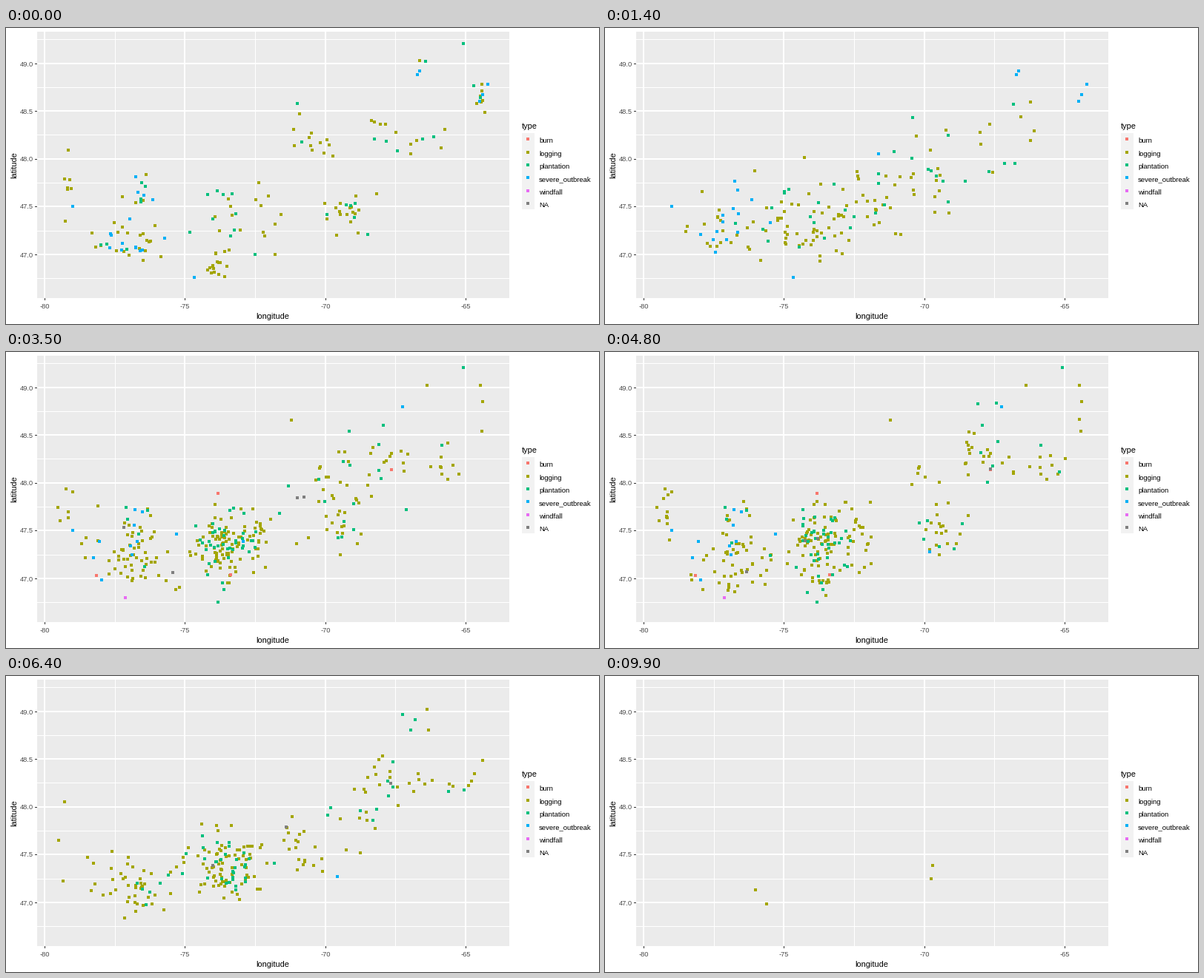
Recreate the animation shown at these times as a matplotlib script. Size 800 by 400 pixels, loop 10000 ms.

```python
import numpy as np
import matplotlib.pyplot as plt
from matplotlib.animation import FuncAnimation
from matplotlib.patches import Rectangle

W, H, DPI = 800, 400, 100
PX = 72 / DPI
rng = np.random.default_rng(11)
plt.rcParams["font.family"] = "Liberation Sans"

COLORS = {
    "burn": "#F8766D",
    "logging": "#A3A500",
    "plantation": "#00BF7D",
    "severe_outbreak": "#00B0F6",
    "windfall": "#E76BF3",
    "NA": "#7F7F7F",
}

# regions where sites gather: centre and spread in pixels
REGIONS = {
    "border": (80, 220, 5, 30),
    "west": (170, 293, 28, 20),
    "upland": (178, 222, 12, 18),
    "centre": (292, 256, 22, 28),
    "south": (285, 318, 8, 10),
    "river": (347, 250, 12, 28),
    "lake": (420, 160, 16, 16),
    "east": (460, 240, 20, 20),
    "hills": (508, 140, 14, 18),
    "coast": (580, 152, 22, 10),
    "tip": (639, 95, 4, 20),
    "north": (550, 56, 22, 8),
}


def cloud(*keys, **counts):
    """A few key sites plus random sites scattered over the regions."""
    parts = [np.array(keys, float).reshape(-1, 2)]
    for region, n in counts.items():
        x, y, sx, sy = REGIONS[region]
        z = np.clip(rng.normal(size=(n, 2)), -2, 2)
        parts.append([x, y] + z * [sx, sy])
    return np.vstack(parts)


def pair(a, b, spread):
    """Match sites of two surveys by a loose west to east order."""
    a = a[np.argsort(a[:, 0] + rng.normal(0, spread, len(a)))]
    b = b[np.argsort(b[:, 0] + rng.normal(0, spread, len(b)))]
    pick = np.linspace(0, len(b) - 1, len(a)).round().astype(int)
    return a, b[pick]


NONE = cloud()

log = [
    cloud((558, 44), (396, 116), border=7, west=20, upland=4, centre=6,
          south=18, river=9, lake=11, east=17, hills=5, coast=5, tip=7),
    cloud(west=42, upland=14, centre=52, south=6, river=18, lake=10, east=8,
          hills=4, coast=2),
    cloud(border=5, west=38, upland=4, centre=45, south=4, river=14, lake=2,
          east=8, hills=7, coast=4, tip=1),
    cloud((605, 37), (537, 44), west=32, upland=2, centre=36, river=8, lake=4,
          east=15, hills=8, coast=6),
]
log_rest = [
    NONE,
    cloud((385, 92), (568, 45), (640, 45), (81, 185), border=5, upland=4,
          centre=20, river=3, lake=4, east=10, hills=6, coast=8, tip=2),
    cloud((71, 222), (79, 170), (77, 277), (568, 45), (643, 114), (628, 142),
          centre=24, river=2, hills=4, coast=5),
]

plant = [
    cloud((617, 21), (566, 45), (393, 102), west=3, upland=4, centre=10,
          lake=1, east=6, hills=3, coast=2, tip=2),
    cloud(west=1, upland=1, centre=18, river=8, lake=7, east=6, hills=3),
    cloud(west=2, centre=24, south=2, east=6, hills=4, coast=1, north=2),
    cloud(west=4, centre=11, river=2, lake=1, hills=4, coast=1, north=1),
]
plant_rest = [
    NONE,
    cloud((617, 21), (588, 126), (509, 99), upland=3, centre=11, south=3),
    cloud((552, 59), (597, 156), (243, 240), centre=7),
]

outbreak = [
    cloud((90, 241), (175, 297), west=10, upland=3),
    cloud((90, 241), (535, 74), (118, 278), (129, 308), (126, 256), (230, 246),
          west=3, upland=3),
]
outbreak_rest = cloud((198, 232), (254, 337), (555, 63), (558, 58), (639, 99),
                      (643, 90), (650, 76))
last_outbreak = cloud((447, 271))

unknown = [
    cloud((252, 299), (311, 225), (475, 155), (74, 223)),
    cloud((188, 297), (529, 155), (279, 256), (279, 256)),
    cloud((505, 142), (513, 138)),
]
burn = cloud((122, 302), (286, 191), (303, 301), (520, 159))
windfall = cloud((161, 332))

last_from = cloud((420, 216), (419, 251), (405, 255), (404, 217))
last_to = cloud((203, 289), (218, 308), (440, 274), (442, 256))

# start, end, {type: (from, to, resting)}
LEGS = [
    (0, 25, {
        "logging": (*pair(log[0], log[1], 110), NONE),
        "plantation": (*pair(plant[0], plant[1], 70), NONE),
        "severe_outbreak": (*pair(*outbreak, 40), outbreak_rest)}),
    (25, 49, {
        "logging": (*pair(log[1], log[2], 25), log_rest[1]),
        "plantation": (*pair(plant[1], plant[2], 35), plant_rest[1]),
        "severe_outbreak": (cloud((230, 246)), last_outbreak, outbreak[1]),
        "burn": (NONE, NONE, burn),
        "windfall": (NONE, NONE, windfall),
        "NA": (unknown[0], unknown[1], NONE)}),
    (49, 74, {
        "logging": (*pair(log[2], log[3], 30), log_rest[2]),
        "plantation": (*pair(plant[2], plant[3], 30), plant_rest[2]),
        "severe_outbreak": (NONE, NONE, last_outbreak),
        "NA": (unknown[1][:2], unknown[2], unknown[1][2:])}),
    (74, 99, {
        "logging": (last_from, last_to, log[3]),
        "plantation": (NONE, NONE, plant[3]),
        "NA": (NONE, NONE, unknown[2])}),
]

fig = plt.figure(figsize=(W / DPI, H / DPI), dpi=DPI, facecolor="white")
ax = fig.add_axes([0, 0, 1, 1])
ax.set(xlim=(0, W), ylim=(H, 0))
ax.axis("off")


def box(x, y, w, h, color):
    ax.add_patch(Rectangle((x, y), w, h, fc=color, lw=0, antialiased=False))


def label(x, y, s, size=9.4, color="black", **kw):
    ax.text(x, y, s, fontsize=size * PX, color=color, **kw)


def lon_px(lon):
    return int(52.4 + 37.87 * (lon + 80))


def lat_px(lat):
    return int(48 + 129.2 * (49 - lat))


# panel, grid, ticks
box(42, 5, 637, 360, "#EBEBEB")
for lon in (-77.5, -72.5, -67.5):
    box(lon_px(lon), 5, 1, 360, "white")
for lat in np.arange(46.75, 49.5, 0.5):
    box(42, lat_px(lat), 637, 1, "white")
for lon in range(-80, -60, 5):
    x = lon_px(lon)
    box(x - 1, 5, 2, 360, "white")
    box(x, 365, 1, 3, "#333333")
    label(x, 379, str(lon), color="#4D4D4D", ha="center")
for lat in np.arange(47, 49.5, 0.5):
    y = lat_px(lat)
    box(42, y - 1, 637, 2, "white")
    box(39, y, 3, 1, "#333333")
    label(37, y + 3.5, f"{lat:.1f}", color="#4D4D4D", ha="right")

label(359.5, 393, "longitude", 11, ha="center")
label(16, 185, "latitude", 11, rotation=90, ha="right", va="center")
label(696, 136, "type", 11)

# legend
DOT = (4 * PX) ** 2
box(696, 142, 17, 103, "#F2F2F2")
rows = np.round(150.5 + 17.3 * np.arange(len(COLORS)))
ax.scatter(np.full(len(rows), 704), rows, s=DOT, c=list(COLORS.values()),
           lw=0, antialiased=False, zorder=3)
for name, y in zip(COLORS, rows):
    label(719, y + 5, name, 9.5)

dots = ax.scatter([], [], s=DOT, lw=0, antialiased=False, zorder=3)


def draw(i):
    start, end, groups = next(l for l in reversed(LEGS) if i >= l[0])
    t = (i - start) / (end - start)
    places, colors = [], []
    for name, (a, b, rest) in groups.items():
        p = a + (b - a) * t
        if t < 1:
            p = np.vstack([p, rest])
        places.append(p)
        colors += [COLORS[name]] * len(p)
    dots.set_offsets(np.round(np.vstack(places)))
    dots.set_facecolors(colors)
    return (dots,)


anim = FuncAnimation(fig, draw, frames=100, interval=100, repeat=True,
                     repeat_delay=0, blit=False)
plt.show()
```
